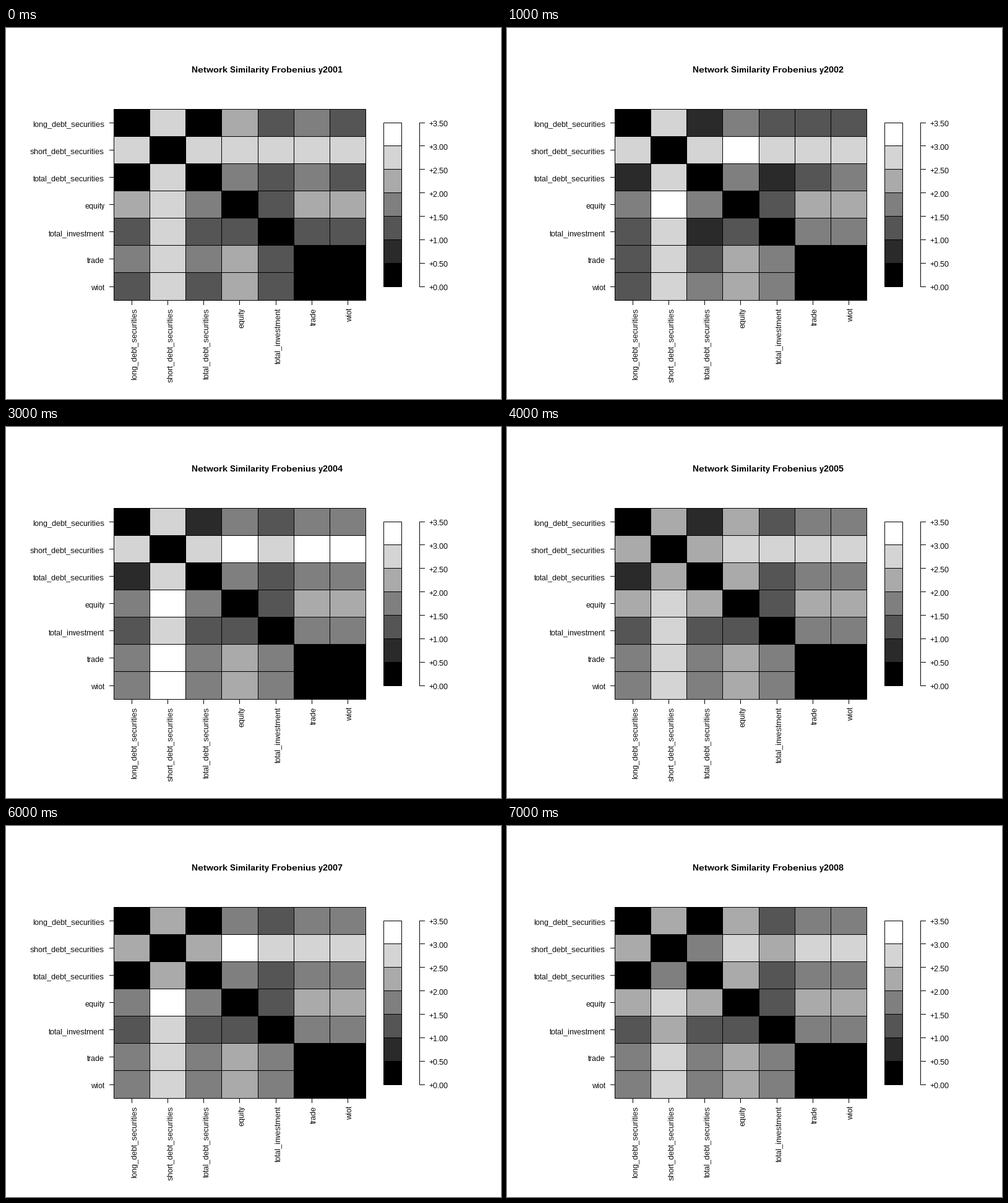
A matplotlib script that plays this animation: 800x600 px, repeating every 8000 ms.

```python
import math

import matplotlib.pyplot as plt
from matplotlib.animation import FuncAnimation
from matplotlib.patches import Rectangle

plt.rcParams.update({
    "font.family": "Liberation Sans",
    "text.hinting": "native",
    "text.hinting_factor": 1,
    "text.kerning_factor": 6,
})

W, H, DPI = 800, 600, 72          # at 72 dpi one point is one pixel
LABEL_SIZE, TITLE_SIZE = 12, 14.4

LABELS = ["long_debt_securities", "short_debt_securities",
          "total_debt_securities", "equity", "total_investment",
          "trade", "wiot"]
N = len(LABELS)

# Upper triangle of the distance matrix, one shade level per digit
LEVELS = {
    2001: "504232 55555 3232 244 22 0",
    2002: "513222 56555 3123 244 33 0",
    2003: "513223 56555 3233 244 33 0",
    2004: "513233 56566 3233 244 33 0",
    2005: "414233 45555 4233 244 33 0",
    2006: "413233 46566 3233 244 33 0",
    2007: "403233 46555 3233 244 33 0",
    2008: "404233 35455 4233 244 33 0",
}
YEARS = sorted(LEVELS)
SHADES = ["#" + f"{255 * k // 6:02x}" * 3 for k in range(7)]


def steps(start, step, count):
    return [start + step * i for i in range(count)]


X_EDGES = [math.floor(x) for x in steps(174.4, 58.17, N + 1)]
Y_EDGES = [math.floor(y) for y in steps(131.1, 44.13, N + 1)]
X_TICKS = steps(203.4, 58.17, N)
Y_TICKS = steps(153.2, 44.15, N)
KEY_TICKS = steps(153.1, 37.86, 8)

fig = plt.figure(figsize=(W / DPI, H / DPI), dpi=DPI, facecolor="white")
ax = fig.add_axes([0, 0, 1, 1])
ax.set_xlim(0, W)
ax.set_ylim(H, 0)
ax.axis("off")


def line(x0, y0, x1, y1):
    ax.plot([x0, x1], [y0, y1], color="black", lw=1, snap=False,
            solid_capstyle="butt")


def box(x0, y0, x1, y1, color):
    """Filled box whose one-pixel outline runs through the given pixels."""
    patch = Rectangle((x0 + 0.5, y0 + 0.5), x1 - x0, y1 - y0, lw=1,
                      facecolor=color, edgecolor="black", snap=False)
    return ax.add_patch(patch)


def text(x, y, s, ha, size=LABEL_SIZE, **kw):
    return ax.text(x, y, s, ha=ha, va="baseline", size=size, **kw)


# Heat map
cells = [[box(X_EDGES[c], Y_EDGES[r], X_EDGES[c + 1], Y_EDGES[r + 1], "black")
          for c in range(N)] for r in range(N)]

# Axes of the heat map
for label, x, y in zip(LABELS, X_TICKS, Y_TICKS):
    row, col = math.floor(y) + 0.5, math.floor(x) + 0.5
    line(167, row, 174, row)
    text(159, y + 6, label, "right")
    line(col, 441, col, 448)
    text(x + 7, 453, label, "right", rotation=90, rotation_mode="anchor")

# Colour key with its scale
key_y = [math.floor(y) for y in KEY_TICKS]
for k in range(7):
    box(610, key_y[k], 639, key_y[k + 1], SHADES[6 - k])
line(668.5, key_y[0], 668.5, key_y[-1] + 1)
for k, y in enumerate(key_y):
    line(668, y + 0.5, 677, y + 0.5)
    text(683, KEY_TICKS[k] + 6, f"+{3.5 - k / 2:.2f}", "left")

title = text(422, 72, "", "center", TITLE_SIZE, weight="bold")


def update(i):
    year = YEARS[i]
    title.set_text(f"Network Similarity Frobenius y{year}")
    for r, row in enumerate(LEVELS[year].split()):
        for c, level in enumerate(row, r + 1):
            shade = SHADES[int(level)]
            cells[r][c].set_facecolor(shade)
            cells[c][r].set_facecolor(shade)
    return []


anim = FuncAnimation(fig, update, frames=len(YEARS), interval=1000,
                     repeat=True, repeat_delay=0, blit=False)
plt.show()
```
